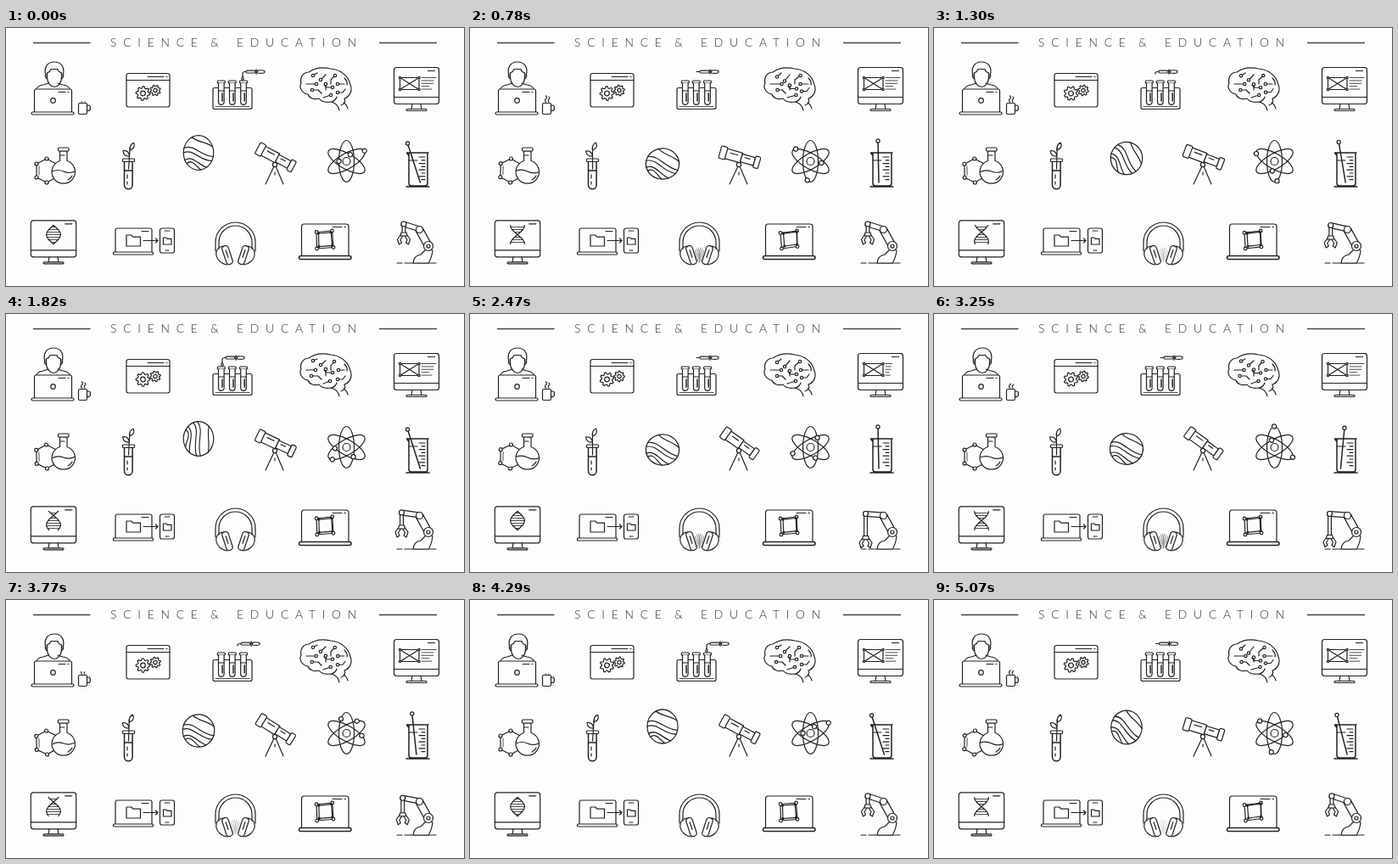
An HTML page that plays this animation: 540x304 px, repeating every 5.2 s.

```html
<!DOCTYPE html>
<html lang="en">
<head>
<meta charset="utf-8">
<title>Science &amp; Education icons</title>
<style>
  html, body { margin: 0; width: 100%; height: 100%; overflow: hidden; background: #fdfdfd; }
  svg { display: block; width: 100vw; height: 100vh; }
  .ink { fill: none; stroke: #222; stroke-width: 1.2; stroke-linecap: round; stroke-linejoin: round; }
  .paper { fill: #fdfdfd; }
  .solid { fill: #222; }
  .fine { stroke-width: .8; }
  .bold { stroke-width: 1.5; }
  text { font: 300 13.8px Lato, Inter, sans-serif; letter-spacing: 7.8px; fill: #333; }
</style>
</head>
<body>
<svg viewBox="0 0 540 304">
  <path d="M32 17.5H99.5M440 17.5H508" stroke="#444" stroke-width="1.3"/>
  <text x="123" y="22">SCIENCE</text>
  <text x="241" y="22">&amp;</text>
  <text x="272" y="22">EDUCATION</text>
  <g class="ink" id="fixed"></g>
  <g class="ink" id="moving"></g>
</svg>
<script>
const LOOP = 5200, STEP = 130, CYCLE = 33;
const BEATS = [0, 6, 14, 19, 25, 33, 39];

// Eased value at step k between the given poses.
function pose(k, values, beats = BEATS) {
  let i = 0;
  while (i < beats.length - 2 && k >= beats[i + 1]) i++;
  const u = Math.min(1, (k - beats[i]) / (beats[i + 1] - beats[i]));
  return values[i] + (values[i + 1] - values[i]) * u * u * (3 - 2 * u);
}

const path = (d, more = '') => `<path d="${d}" ${more}/>`;
const dot = (x, y, r, c = 'paper') => `<circle cx="${x}" cy="${y}" r="${r}" class="${c}"/>`;
const box = (x, y, w, h, r = 0) =>
  `<rect x="${x}" y="${y}" width="${w}" height="${h}" rx="${r}" class="paper"/>`;
const group = (transform, body) => `<g transform="${transform}">${body}</g>`;
const mirror = (axis, body) => group(`translate(${axis * 2} 0) scale(-1 1)`, body);
const poly = pts => 'M' + pts.map(p => p.map(v => v.toFixed(2)).join(' ')).join('L') + 'Z';
const link = (d, w) =>
  path(d, `stroke-width="${w}"`) + path(d, `stroke="#fdfdfd" stroke-width="${w - 2.4}"`);

function gear(x, y, r, teeth, angle) {
  const pts = [];
  for (let i = 0; i < teeth * 4; i++) {
    const a = (i / (teeth * 4)) * 2 * Math.PI;
    const q = i % 4 < 2 ? r : r * .74;
    pts.push([q * Math.cos(a), q * Math.sin(a)]);
  }
  return group(`translate(${x} ${y}) rotate(${angle})`, path(poly(pts), 'class="paper"') + dot(0, 0, r * .34));
}

const monitor = (x, y, w) => box(x, y, w, 43, 3)
  + path(`M${x} ${y + 35}h${w}M${x + w / 2 - 5} ${y + 43}l-1 6h12l-1 -6M${x + w - 13} ${y + 4}h8`)
  + box(x + w / 2 - 12, y + 49, 24, 2, 1);

const folder = (x, y, w, h) =>
  path(`M${x} ${y + h}V${y}h${w * .35}l${w * .12} ${h * .16}H${x + w}V${y + h}Z`);

const testTube = x => box(x - 4.5, 62, 9, 3, 1)
  + path(`M${x - 3.3} 65V87a3.3 3.3 0 0 0 6.6 0V65`, 'class="paper"')
  + path(`M${x - 3.3} 74H${x + 3.3}`) + path(`M${x + 1.2} 77V86`, 'class="bold"');

function fixedParts() {
  let s = '';
  // browser window
  s += box(142, 53.5, 51, 39.5, 2.5) + path('M142 61.5H193M167 57.5h19M189 57.5h1');
  // tube rack
  s += path('M246 70.5H288a2 2 0 0 1 2 2V93.5a2 2 0 0 1 -2 2H246a2 2 0 0 1 -2 -2V72.5a2 2 0 0 1 2 -2Z');
  s += path('M247 92.5H287', 'class="fine"') + [253.8, 266.8, 280].map(testTube).join('');
  // brain outline
  s += path('M393 97C392 92 388 88 383 87C377 88 372 87 369 83C363 85 357 82 356 78C349 77 345 70 348 65'
    + 'C346 58 351 52 357 52C364 47 374 46 383 48C395 49 404 57 406 67C409 74 405 81 399 83C401 88 398 90 395 91'
    + 'M403 95C402 91 400 89 398 88');
  s += path('M384 87q5 -2 6 -6M399 59q4 4 3 8');
  // desktop with picture
  s += monitor(457.5, 46.5, 53) + box(464.5, 58.5, 22.5, 14) + path('M464.5 58.5l22.5 14M487 58.5l-22.5 14');
  for (const x of [464.5, 487]) s += dot(x, 58.5, 1.2) + dot(x, 72.5, 1.2);
  // plant tube
  s += box(137.5, 154, 14, 3.5, 1)
    + path('M139.5 158V185a4.8 4.8 0 0 0 9.6 0V158M139.5 168H149', 'class="bold"')
    + path('M143 173v4M143 181v3');
  // desktop for the helix
  s += monitor(29.3, 226.8, 53.4);
  // file transfer
  s += path('M129 264V238a2 2 0 0 1 2-2H170a2 2 0 0 1 2 2V264') + box(126.5, 264, 47, 3, 1)
    + path('M160 239.5h8') + folder(142, 244, 16.5, 13)
    + box(181.5, 236, 17, 29, 2.5) + path('M187 239h6M188 262h4') + folder(185.5, 247, 9.5, 8)
    + path('M162 250.5H179M176.5 248l2.5 2.5l-2.5 2.5');
  // laptop with shape
  s += path('M348.5 268.5V234a3 3 0 0 1 3-3H401a3 3 0 0 1 3 3V268.5')
    + `<g class="bold">${box(345.5, 268.5, 61.5, 4, 2)}</g>`
    + path('M385 234.5h11M399 234.5h1.5');
  // headphones
  s += path('M247 263V252.5A23.5 23.5 0 0 1 294 252.5V263M251 260V252.5A19.5 19.5 0 0 1 290 252.5V260');
  const cup = path('M256 257C243 259 246 277 261 279')
    + group('translate(261 267.5) rotate(-18)', box(-3.8, -11.3, 7.6, 22.6, 3.5) + path('M0 -6V3'));
  return s + cup + mirror(270.5, cup);
}

function person(k) {
  const turn = pose(k, [1, 0, 0, 0, 1, 1, 0]);
  const head = path('M46 57C43 46 48 40 56 40S69 46 66 57', 'class="paper"')
    + path('M47.5 53V58C47.5 65 52 69.5 56 69.5S64.5 65 64.5 58V53')
    + path('M47.5 53C50 52 51.5 50 52 48.5H60C60 50 62 52 64.5 53')
    + path('M46 54q-2 3 1.5 6M66 54q2 3 -1.5 6');
  const steam = pose(k, [0, 1, 1, 1, .7, 0, .6]);
  const puff = `pathLength="1" stroke-dasharray="${Math.max(steam, .01)} 2"`;
  return path('M35 74q1 -6 9 -7l6 -2M76 74q-1 -6 -9 -7l-6 -2')
    + group(`translate(${turn} 0)`, head)
    + box(33.5, 72, 44, 28, 2) + box(30, 99, 50, 3, 1.5) + dot(55.5, 85.5, 2.8) + path('M62 75.5h8M73 75.5h1')
    + box(85.5, 88.5, 10, 13, 1.5) + path('M95.5 91h2q2 0 2 3.2t-2 3.2h-2')
    + path('M89.5 87q-2 -2 0 -3.5t0 -3.5', puff) + path('M93 87q-1.5 -2 0 -3t0 -3', puff);
}

function dropper(k) {
  const x = pose(k, [279, 267, 255, 267, 267, 279, 261.5]);
  const pour = pose(k, [1, 0, 1, 0, 0, 1, 0]);
  const d = 5 * pour;
  let s = path(`M${x} ${51.5 + d}V${51.5 + d * .4}Q${x} 51.5 ${x + 3} 51.5H${x + 5}`)
    + box(x + 4, 50.2, 11, 2.8, 1.2) + path(`M${x + 16} 49v5`, 'class="bold"')
    + path(`M${x + 17.5} 50.2q5 -1 8 .2q1.4 1.2 0 2.4q-3 1.2 -8 .2Z`, 'class="paper"');
  if (pour > .5) s += path(`M${x} 57q-2.4 3.2 0 4.4q2.4 -1.2 0 -4.4Z`, 'class="paper"');
  return s;
}

function circuits(k) {
  const d = pose(k, [0, 1.5, -1, 1, -.5, 0, 1.5]);
  const ends = [[366 + d, 66], [371, 61 + d], [388 + d, 56], [362, 56 + d], [361 + d, 73],
    [385, 70 + d], [383 + d, 79], [391 - d, 66], [391, 76 - d], [377, 66 + d]];
  const lines = ['H354', 'L377 55', 'L383 61V66', 'L367 53', 'H368l4 4', 'H378l-3 -3', 'L374 82', 'H399', 'H397l3 -4', 'V73'];
  return ends.map(([x, y], i) => path(`M${x} ${y}${lines[i]}`) + dot(x, y, 1.7)).join('');
}

function typing(k) {
  const full = pose(k, [1, 1, 1, .45, 1, 1, 1]);
  return [17, 14, 17, 11, 15].map((w, i) =>
    path(`M490 ${58.5 + i * 3.4}h${w * (i > 1 ? full * .8 : full)}`, 'class="fine"')).join('');
}

function chemistry(k) {
  const sway = 2 * Math.sin(k * .38);
  const ring = [[59, 160], [48, 154], [36, 160], [36, 176], [48, 182], [59, 176]];
  const bonds = path(poly(ring)) + path('M39 163V173', 'class="fine"')
    + ring.slice(1, 5).map(([x, y]) => dot(x, y, 2)).join('');
  return group(`rotate(${sway} 48 168)`, bonds)
    + path('M63.5 145V156.5A13.7 13.7 0 1 0 72 156.5V145Z', 'class="paper"') + box(61.5, 141, 12.5, 4, 1)
    + path('M63.5 150H69')
    + group(`rotate(${sway * 2} 68 169)`, path('M54.5 169q6.5 -3 13.3 0t13.3 0'))
    + path('M73 179q4 -2 5 -5');
}

const sprout = k => group(`rotate(${pose(k, [4, 0, 3, 0, 0, 4, 2])} 144.5 166)`,
  path('M144.5 166V141M144.5 151q-7 1 -8 -6q7 -1 8 6Z') + path('M144.5 144q-1 -7 4 -9q3 6 -4 9Z'));

function ball(k) {
  const y = pose(k, [147, 160, 147, 160, 148, 159, 149, 160, 150], [0, 6, 14, 19, 22, 25, 33, 36, 39]);
  const low = (y - 147) / 13;
  const spin = pose(k, [0, 12, 70, 12, 10, 0, 25]);
  const bands = dot(0, 0, 18.5)
    + path('M-18 -5C-6 -10 3 4 18 4M-18.4 0C-7 -5 2 9 16.5 8.5M-17 8C-8 2 0 13 10 15.5'
      + 'M-14.5 11.5C-8 6 -3 15 3 18.2M-8 -16.5C0 -11 8 -12 17.3 -6.5');
  return group(`translate(227 ${y}) scale(${.96 + low * .1} ${1.1 - low * .12}) rotate(${spin})`, bands);
}

function telescope(k) {
  const tube = box(-17, -6, 19, 12) + box(2, -4.8, 16, 9.6) + box(-24, -7.5, 7.5, 15, 1.5)
    + box(18, -7, 6, 14, 1.5) + path('M-12 -2H-3M6 -1.5H12');
  return path('M316 163L306 184M318 163L327 184M317 170V173')
    + dot(317, 161, 2.6)
    + group(`translate(318 152.5) rotate(${pose(k, [28, 16, 25, 35, 36, 28, 17])})`, tube);
}

function atom(k) {
  const turn = k / CYCLE;
  const orbits = [[-30, turn], [90, .25 - turn], [30, -.25 - turn]];
  const rings = orbits.map(([a]) => group(`rotate(${a})`, '<ellipse rx="24.5" ry="9"/>')).join('');
  const electrons = orbits.map(([a, t]) => {
    const p = t * 2 * Math.PI;
    return group(`rotate(${a})`, dot(24.5 * Math.cos(p), 9 * Math.sin(p), 2.6));
  }).join('');
  return group('translate(401.5 157)', rings + dot(0, 0, 4.5) + electrons);
}

function beaker(k) {
  const x = pose(k, [473.5, 481, 473.5, 481, 484, 473.5, 475]);
  const y = 133 + Math.abs(481 - x) * .4;
  const foot = 482 + (481 - x) * .85;
  let s = path(`M${x} ${y}L${foot} 182`, 'class="bold"') + dot(x, y, 2.1)
    + path('M472.5 147H498M475 147V183q0 3 3 3H494q3 0 3 -3V147M472.5 147l2.5 3.5M472 187H499', 'class="bold"')
    + path('M475 156H485');
  for (let i = 0; i < 8; i++) s += path(`M${i % 2 ? 490 : 487} ${152 + i * 3.8}H494`);
  return s;
}

function helix(k) {
  const phase = pose(k, [0, .5, .774, 1, 1.5, 2, 2.5]) * Math.PI;
  const wide = y => 8.3 * Math.cos(Math.PI * y / 22 + phase);
  const strand = side => {
    let d = '';
    for (let y = -11; y <= 11; y++) d += `${d ? 'L' : 'M'}${(side * wide(y)).toFixed(2)} ${y}`;
    return path(d);
  };
  let rungs = '';
  for (let y = -9; y <= 9; y += 3) rungs += `M${-wide(y)} ${y}H${wide(y)}`;
  return group('translate(56 243.5)', path(rungs, 'class="fine"') + strand(1) + strand(-1));
}

function sound(k) {
  const level = pose(k, [0, 1, 0, 1, 1, 0, .25]);
  const waves = path('M266.5 273q2 -5 -1 -11M268.2 274.5q2.5 -7 -1 -14M270 276q2.5 -8 -1 -17', 'class="fine"');
  return `<g opacity="${level * .65}">${waves}${mirror(270.5, waves)}</g>`;
}

function frameShape(k) {
  const d = pose(k, [1, 3, 1.5, 2, 2, 1, 3]);
  const front = [[366, 240 + d / 2], [384 + d / 2, 239], [386, 259 - d / 2], [366 + d / 2, 260]];
  const back = front.map(([x, y]) => [376 + (x - 376) * .8 + d * .5, 249.5 + (y - 249.5) * .8 - d * .3]);
  return path(poly(back)) + path(poly(front))
    + front.map(([x, y], i) => path(`M${x} ${y}L${back[i][0]} ${back[i][1]}`, 'class="fine"')).join('')
    + front.map(([x, y]) => dot(x, y, 1.8)).join('')
    + back.map(([x, y]) => dot(x, y, 1, 'solid')).join('');
}

function robot(k) {
  const x = pose(k, [469, 469, 466.5, 466.5, 466.5, 469, 469]);
  const y = pose(k, [231, 231, 234, 235.5, 235.5, 231, 231]);
  const drop = pose(k, [10, 10, 15, 26, 25, 10, 10]);
  const claw = path('M-3 0H3L4 4H-4ZM-4 3L-7.5 8L-5.5 14L-2.5 12L-4 8.5L-1 4M4 3L7.5 8L5.5 14L2.5 12L4 8.5L1 4', 'class="paper"');
  return path('M461 277H467M470 277H507')
    + path('M480 277q1 -9 9 -10l7 -7l7 2q-1 9 -5 15Z', 'class="paper"')
    + link('M498 257L487.5 238', 10) + link(`M487.5 237L${x} ${y}`, 7)
    + dot(498, 257, 5.5) + dot(498, 257, 2) + dot(487.5, 237.5, 4)
    + link(`M${x} ${y}V${y + drop}`, 5) + dot(x, y, 3)
    + group(`translate(${x} ${y + drop})`, claw);
}

const scene = [person, dropper, circuits, typing, chemistry, sprout, ball, telescope,
  atom, beaker, helix, sound, frameShape, robot];
const gears = k => gear(161.5, 77, 8.3, 8, k * 6) + gear(176, 73.5, 6.3, 8, 20 - k * 6);

const moving = document.getElementById('moving');
document.getElementById('fixed').innerHTML = fixedParts();
let shown = -1;

function draw() {
  const k = Math.floor((performance.now() % LOOP) / STEP);
  if (k !== shown) {
    moving.innerHTML = gears(k) + scene.map(part => part(k)).join('');
    shown = k;
  }
  requestAnimationFrame(draw);
}
draw();
</script>
</body>
</html>
```
